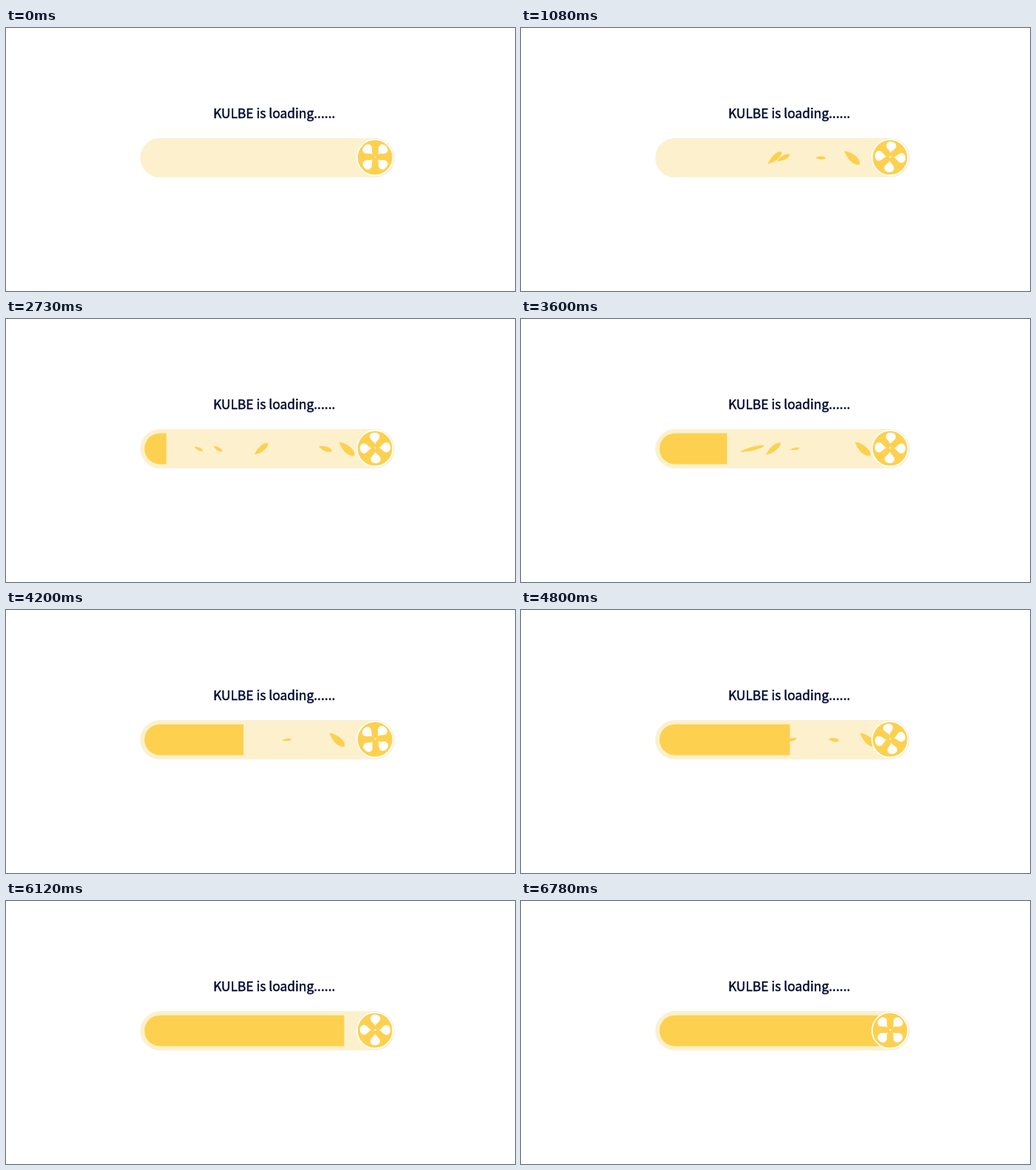
Write an HTML page that moves like this. It is 690 px wide and 356 px high and loops after 6840 ms.

```html
<!DOCTYPE html>
<html lang="en">
<head>
<meta charset="utf-8">
<title>Loading</title>
<style>
  html, body { margin: 0; width: 100%; height: 100%; overflow: hidden; background: #fff; }
  svg { display: block; }
  text {
    font: 500 17.4px "Noto Sans CJK SC", "Noto Sans", sans-serif;
    fill: #020b33; stroke: #020b33; stroke-width: .5px;
  }
</style>
</head>
<body>
<svg width="690" height="356" viewBox="0 0 690 356">
  <defs>
    <clipPath id="done"><rect id="edge" x="180" y="150" width="0" height="52"/></clipPath>
    <path id="petal" d="M0-5C-1.3-9-6.7-11-6.7-15.2C-6.7-18.6-3.8-20.7 0-20.7C3.8-20.7 6.7-18.6 6.7-15.2C6.7-11 1.3-9 0-5Z"/>
  </defs>
  <text x="335.5" y="122" text-anchor="end">KULBE</text>
  <text x="339.5" y="122">is loading......</text>
  <rect x="182.5" y="149.5" width="344" height="52.3" rx="26.1" fill="#fdf1cd" stroke="#f8f0d6"/>
  <g fill="#fdd04f">
    <g id="leaves"></g>
    <rect x="187.7" y="154.7" width="335" height="41.7" rx="20.8" clip-path="url(#done)"/>
    <circle cx="500.2" cy="175.2" r="24.3" stroke="#fff" stroke-width="1.8"/>
  </g>
  <g id="fan" fill="#fff"><circle r="1.2"/></g>
</svg>
<script>
const LOOP = 6840, STEP = 30, FINISH = 6780;
const BAR_LEFT = 187.5, HUB = 490;
const DRIFT = 0.1375;       // leaf speed, px per ms
const FILL = 0.0711;        // progress speed, px per ms
const FILL_START = 2310;
const SPIN = 6.4 / STEP;    // fan speed, degrees per ms

// when each leaf leaves the fan
const births = [20, 105, 470, 780, 1065, 1255, 1685, 2315, 2525, 2735, 3405, 3900, 4320, 4655, 5020];

// every leaf tumbles the same way along the bar: x, angle, length, width
const tumble = [
  [225, 0, 8, 0],
  [260, 25, 13, 4],
  [287, 32, 14, 4.5],
  [314, -15, 35, 5],
  [345, -42, 25, 8],
  [371, -8, 13, 3],
  [425, 8, 15, 5],
  [449, 42, 28, 10]
];

const byId = id => document.getElementById(id);

function add(parent, name, attrs) {
  const node = document.createElementNS("http://www.w3.org/2000/svg", name);
  for (const key in attrs) node.setAttribute(key, attrs[key]);
  return byId(parent).appendChild(node);
}

for (let a = 0; a < 360; a += 90) add("fan", "use", { href: "#petal", transform: `rotate(${a})` });
const leaves = births.map(() => add("leaves", "path", { d: "M-.5 0C-.2-.6 .35-.75 .5 0C.3 .65-.1 .6-.5 0Z" }));

function poseAt(x) {
  const next = tumble.findIndex(key => key[0] > x);
  if (next < 0) return tumble[tumble.length - 1];
  const from = tumble[Math.max(0, next - 1)], to = tumble[next];
  const u = (x - from[0]) / (to[0] - from[0] || 1);
  return from.map((v, i) => v + (to[i] - v) * u);
}

function drawLeaf(leaf, age, edge) {
  const x = HUB - DRIFT * age;
  const shown = age > 0 && x > Math.max(tumble[0][0], edge - 20);
  leaf.style.display = shown ? "" : "none";
  if (!shown) return;
  const [, angle, length, width] = poseAt(x);
  leaf.setAttribute("transform", `translate(${x} 175.8) rotate(${angle}) scale(${length} ${width})`);
}

function draw(now) {
  const t = Math.floor((now % LOOP) / STEP) * STEP;
  const filled = FILL * Math.max(0, t - FILL_START);
  const edge = BAR_LEFT + filled;
  byId("edge").setAttribute("width", filled && edge - 180);
  leaves.forEach((leaf, i) => drawLeaf(leaf, t - births[i], edge));
  const angle = t < FINISH ? 45 + SPIN * t : 45;
  byId("fan").setAttribute("transform", `translate(500.5 174.5) rotate(${angle})`);
}

const start = performance.now();
function tick() {
  draw(performance.now() - start);
  requestAnimationFrame(tick);
}
tick();
</script>
</body>
</html>
```
